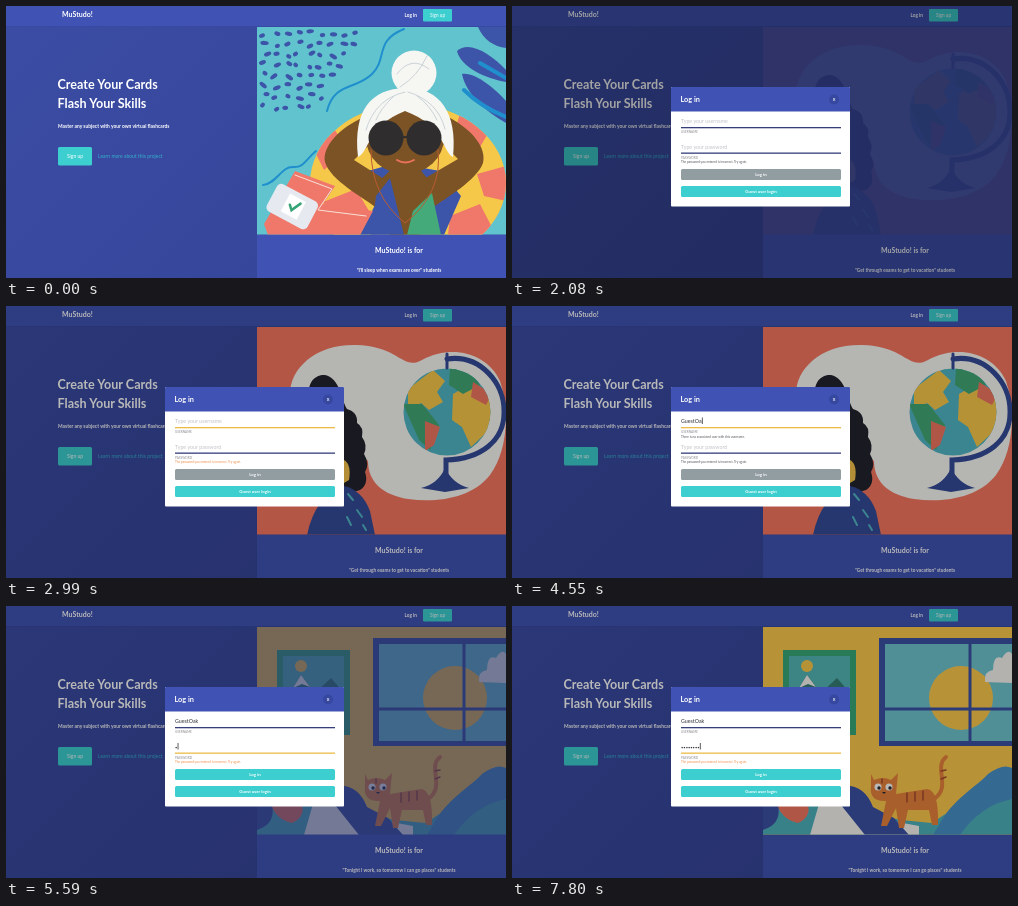
Write an HTML page that moves like this. It is 500x272 px and loops after 8000 ms.

```html
<!DOCTYPE html>
<html lang="en">
<head>
<meta charset="utf-8">
<title>Flashcards login</title>
<style>
  html, body { margin: 0; width: 100%; height: 100%; overflow: hidden; }
  svg { display: block; width: 100vw; height: 100vh; font-family: Lato, "Open Sans", sans-serif; }
  .page text { fill: #fff; font-size: 4.7px; }
  .bold { font-weight: 700; }
  .mid { text-anchor: middle; }
  .page .heading { font-size: 12.6px; }
  .page .brand { font-size: 7px; }
  .teal { fill: #3dcfd0; }
  .modal .input { font-size: 5.3px; }
  .modal .input.masked { font-size: 4px; }
  .modal .label { font-size: 3.1px; fill: #8c8c94; }
  .modal .error { font-size: 3.1px; }
  .modal .action { font-size: 4.4px; fill: #fff; }
  .line { fill: none; stroke-linecap: round; }
</style>
</head>
<body>
<svg viewBox="0 0 500 272" preserveAspectRatio="none">
  <defs>
    <linearGradient id="left" x2="1" y2="1">
      <stop stop-color="#3b4ca4"/><stop offset="1" stop-color="#36469a"/>
    </linearGradient>
    <clipPath id="art"><rect x="251" y="21" width="249" height="207.500"/></clipPath>
    <clipPath id="ring"><ellipse cx="402" cy="177" rx="98" ry="79"/></clipPath>
    <clipPath id="earth"><circle cx="441" cy="106" r="43.500"/></clipPath>
  </defs>

  <g class="page">
    <rect width="500" height="272" fill="#4053b4"/>
    <rect y="21" width="251" height="251" fill="url(#left)"/>
    <rect y="20" width="500" height="1" fill="#3849a2"/>
    <text class="brand bold" x="56" y="11">MuStudo!</text>
    <text class="bold" x="398.500" y="10.500">Log in</text>
    <rect class="teal" x="417" y="3" width="29" height="12.500" rx="1"/>
    <text class="mid" x="431.500" y="10.500">Sign up</text>
    <text class="heading bold" x="51.500" y="83">Create Your Cards</text>
    <text class="heading bold" x="51.500" y="101.500">Flash Your Skills</text>
    <text class="bold" x="52" y="122" style="font-size:4.9px">Master any subject with your own virtual flashcards</text>
    <rect class="teal" x="52" y="141" width="34" height="18.500" rx="1.500"/>
    <text class="mid" x="69" y="152" style="font-size:5px">Sign up</text>
    <text x="92" y="152" style="fill:#36b0cf;font-size:5px">Learn more about this project</text>
    <text class="brand bold mid" x="393" y="247">MuStudo! is for</text>
    <text class="bold mid" id="audience" x="393" y="266"></text>

    <rect x="251" y="21" width="249" height="207.500" fill="#3c4da6"/>
    <g clip-path="url(#art)">
      <g class="slide">
        <rect x="251" y="21" width="249" height="208" fill="#61c3cd"/>
        <g id="spots" fill="#3d55a9"></g>
        <g class="line" stroke="#208fcd" stroke-width="2">
          <path d="M257 179C270 178 276 160 287 161S300 153 310 145"/>
          <path d="M321 105C328 76 350 84 366 68S368 35 398 23"/>
        </g>
        <g fill="#3d55a9">
          <path d="M472 21H500V42C488 41 477 33 472 21Z"/>
          <path d="M451 45C463 34 485 48 500 64V76C478 72 455 61 451 45Z"/>
          <path d="M456 68C470 66 490 84 500 95V117C480 106 460 88 456 68Z"/>
        </g>
        <path class="line" stroke="#208fcd" stroke-width="4" d="M458 84Q475 101 500 111M474 57L500 72"/>
        <g clip-path="url(#ring)">
          <rect x="300" y="95" width="200" height="134" fill="#f6c84a"/>
          <path fill="#f0786b" d="M302 132L326 120 342 143 318 164ZM455 105L487 119 474 141 448 126ZM471 168L500 160V195L478 190ZM444 210L474 198 490 229H442ZM317 196L350 183 363 205 335 224Z"/>
        </g>
        <path fill="#3d55a9" d="M341 171L390 157 434 165 455 190 438 229H354L369 199Z"/>
        <g fill="#7b5324">
          <path d="M358 111C333 122 316 141 319 156C324 174 358 192 372 203L389 180 348 154 370 132Z"/>
          <path d="M442 111C466 123 481 142 477 157C471 174 440 192 426 202L409 178 452 153 431 132Z"/>
          <path d="M370 178L392 157H409L428 181 414 229H384Z"/>
          <ellipse cx="399" cy="132" rx="39" ry="36"/>
        </g>
        <path fill="#45aa79" d="M407 205L426 187 435 229H401Z"/>
        <path fill="#3d55a9" d="M370 190L384 172 398 229H365Z"/>
        <path fill="#f6f6f3" d="M352 151C347 104 365 83 399 82C433 81 452 106 447 151C436 145 439 120 399 105C361 120 364 145 352 151Z"/>
        <circle cx="408" cy="67" r="22.500" fill="#f6f6f3"/>
        <path class="line" stroke="#cbd3d8" d="M391 68Q405 49 423 63M394 81Q412 70 421 50M399 86Q369 93 360 124M402 86Q432 95 439 123M388 90Q374 103 370 114M411 90Q424 99 431 114"/>
        <g fill="#302d2e"><circle cx="380" cy="132" r="17.500"/><circle cx="418" cy="132" r="17.500"/></g>
        <path class="line" stroke="#302d2e" stroke-width="2" d="M393 133Q399 129 406 133M371 134Q380 140 388 134M410 134Q419 140 427 134"/>
        <path class="line" stroke="#e9715b" stroke-width="2" d="M391 154Q399 159 408 154"/>
        <path class="line" stroke="#b95c32" d="M365 144Q365 190 399 217Q437 187 432 144"/>
        <path fill="#f0786b" d="M258 218L289 165 329 180 317 198 367 205 354 229H262Z"/>
        <path class="line" stroke="#f7e2d6" d="M289 169L326 183 312 204L360 210"/>
        <g transform="rotate(28 286 201)">
          <rect x="263" y="185" width="46" height="31" rx="5" fill="#e6e9ef"/>
          <rect x="278" y="190" width="18" height="20" fill="#fff"/>
          <path class="line" stroke="#36a477" stroke-width="2.500" d="M283 200L287 204 292 194"/>
        </g>
      </g>

      <g class="slide">
        <rect x="251" y="21" width="249" height="208" fill="#f9775f"/>
        <path fill="#fbfaf7" d="M284 90C283 63 309 38 350 39C394 40 396 65 416 54C446 38 481 47 494 75C505 108 500 148 484 169C466 192 432 197 402 193C377 189 362 176 362 155L336 130Z"/>
        <path fill="#23242d" d="M306 100C297 78 309 68 319 69C334 72 335 93 341 103Q352 106 351 117Q358 121 356 131Q362 139 358 148Q364 158 359 166Q363 178 354 184L334 190Z"/>
        <path fill="#344b98" d="M301 229Q309 190 338 180Q356 184 364 205L369 229Z"/>
        <path fill="#f9c54c" d="M335 153Q346 155 343 174L333 180Z"/>
        <path class="line" stroke="#51b8c7" stroke-width="2" d="M342 188L347 194M351 204L356 211M341 211L345 219M357 219L360 224"/>
        <path class="line" stroke="#344b98" stroke-width="5" d="M441 53C474 48 499 77 498 107C498 134 476 153 440 154V168"/>
        <path fill="#344b98" d="M415 182Q432 178 439 162Q447 178 463 182L439 186Z"/>
        <g clip-path="url(#earth)">
          <rect x="396" y="61" width="91" height="91" fill="#51b8c7"/>
          <path fill="#fcca4c" d="M402 83L427 64 439 75 431 86 437 96 423 104 415 97 402 105ZM447 88L466 77 488 97 482 125 465 141 456 121 446 114Z"/>
          <path fill="#42aa77" d="M397 98L416 98 426 110 433 119 424 144 413 134ZM444 61L467 69 474 79 457 88 443 79Z"/>
          <path fill="#f47762" d="M419 115L434 121 428 139 419 145ZM467 76L486 88 480 99 465 91Z"/>
        </g>
        <path class="line" stroke="#344b98" stroke-width="3" d="M441 48V62"/>
      </g>

      <g class="slide">
        <rect x="251" y="21" width="249" height="208" fill="#ffca4c"/>
        <rect x="271" y="44" width="73" height="85" fill="#39aa78"/>
        <rect x="277" y="50" width="61" height="73" fill="#55b8b8"/>
        <path fill="#347e77" d="M277 98L295 69 309 87 325 72 338 87V123H277Z"/>
        <path fill="#f8f7f2" d="M287 82L295 69 304 81 296 78Z"/>
        <circle cx="295" cy="60" r="6" fill="#fcca4c"/>
        <rect x="367" y="32" width="140" height="108" fill="#3c52a5"/>
        <rect x="373" y="38" width="127" height="97" fill="#70c6d1"/>
        <circle cx="449" cy="92" r="32" fill="#ffca4c"/>
        <path fill="#f8f7f2" d="M473 76Q472 65 481 64Q481 48 490 52Q496 42 500 48V77Z"/>
        <path class="line" stroke="#3c52a5" stroke-width="3" d="M458 37V136M372 103H500"/>
        <path fill="#4fb3bd" d="M251 199H330Q366 213 420 217Q462 187 500 179V229H251Z"/>
        <path fill="#4892c8" d="M427 219C440 194 464 181 476 168Q491 157 500 162V193Q469 199 448 229H421Z"/>
        <path fill="#f8f7f2" d="M307 198H340L369 213 407 220V229H298Z"/>
        <path fill="#3c52a5" d="M329 180Q352 177 361 201L382 212 397 229H353L329 199Z"/>
        <path fill="#f47762" d="M265 199H296Q299 211 286 217Q271 214 265 199Z"/>
        <path fill="#3c52a5" d="M251 199H266Q270 218 251 224Z"/>
        <g fill="#ea843b">
          <path d="M359 168L362 174Q371 170 379 174L386 167 384 188 415 183Q427 184 426 219H420L417 204H396L392 222H387L384 202 375 220H369L374 195Q357 196 359 180Z"/>
          <path class="line" stroke="#ea843b" stroke-width="4" d="M422 193C440 181 421 161 434 151"/>
        </g>
        <path class="line" stroke="#a54b30" stroke-width="1.500" d="M395 187V196M403 186V195M411 185V194M370 173V177M429 173L434 171M429 165L434 164"/>
        <g fill="#fff"><circle cx="366" cy="181" r="3.500"/><circle cx="377" cy="181" r="3.500"/></g>
        <g fill="#27282f"><circle cx="367" cy="182" r="1.700"/><circle cx="378" cy="182" r="1.700"/><path d="M370 186H374L372 188Z"/></g>
      </g>
    </g>
  </g>

  <g class="modal" id="modal">
    <rect id="shade" width="500" height="272"/>
    <rect x="159" y="81" width="179" height="119.500" rx="1" fill="#fff"/>
    <path fill="#4053b4" d="M160 81H337Q338 81 338 82V105.500H159V82Q159 81 160 81Z"/>
    <text class="bold" x="168.500" y="96" font-size="7.300" fill="#fff">Log in</text>
    <circle cx="322" cy="93.500" r="5" fill="#35479f"/>
    <text class="mid bold" x="322" y="95" font-size="4" fill="#fff">X</text>

    <text class="input" id="username" x="169" y="117"></text>
    <rect id="userLine" x="169" y="121" width="160" height="1.300"/>
    <text class="label" x="169" y="127">USERNAME</text>
    <text class="error" id="userError" x="169" y="131.500" fill="#55555c">There is no associated user with this username.</text>

    <text class="input" id="password" x="169" y="142.500"></text>
    <rect id="passLine" x="169" y="146.500" width="160" height="1.300"/>
    <text class="label" x="169" y="152.500">PASSWORD</text>
    <text class="error" id="passError" x="169" y="157.300">The password you entered is incorrect. Try again.</text>
    <rect id="caret" width=".8" height="6.500" fill="#333"/>

    <rect id="submit" x="169" y="163" width="160" height="11" rx="1.500"/>
    <text class="action mid bold" x="249" y="170">Log in</text>
    <rect class="teal" x="169" y="180" width="160" height="11" rx="1.500"/>
    <text class="action mid bold" x="249" y="187">Guest user login</text>
  </g>
</svg>
<script>
  const LOOP = 8000, TICK = 130, FADE = 840;
  const USER = "GuestOak";
  const USER_KEYS = [3250, 3380, 3510, 3770, 4030, 4290, 4550, 4810];
  const PASS_KEYS = [5460, 5980, 6240, 6630, 6890, 7020, 7280, 7540];
  const MODAL_AT = 1170, USER_FOCUS = 2340, PASS_FOCUS = 4940;
  const SLIDES = [
    [-1100, "\"I'll sleep when exams are over\" students"],
    [2015, "\"Get through exams to get to vacation\" students"],
    [5135, "\"Tonight I work, so tomorrow I can go places\" students"]
  ];

  const el = id => document.getElementById(id);
  const fill = (id, color) => el(id).setAttribute("fill", color);
  const show = (id, visible) => { el(id).style.display = visible ? "" : "none"; };
  const typed = (keys, t) => keys.filter(k => t >= k).length;
  const slideEls = document.querySelectorAll(".slide");

  // Loose rows of slanted brush dots, thinning towards the lower right.
  function paintSpots() {
    let seed = 7, dots = "";
    const random = () => (seed = seed * 16807 % 2147483647) / 2147483647;
    for (let row = 0; row < 8; row++) {
      for (let col = 0; col < 9 - row * 0.6; col++) {
        const x = 256 + col * 11 + random() * 6, y = 25 + row * 10.5 + random() * 5;
        dots += `<ellipse cx="${x}" cy="${y}" rx="${2.5 + random() * 1.8}" ry="2.1" transform="rotate(${random() * 80 - 40} ${x} ${y})"/>`;
      }
    }
    el("spots").innerHTML = dots;
  }

  function setInput(id, value, placeholder) {
    el(id).textContent = value || placeholder;
    fill(id, value ? "#303038" : "#c3c3c8");
  }

  function placeCaret(id, value, y) {
    show("caret", value !== "");
    if (!value) return;
    el("caret").setAttribute("x", 169.3 + el(id).getComputedTextLength());
    el("caret").setAttribute("y", y);
  }

  function render(time) {
    const t = Math.floor(time / TICK) * TICK;

    const current = SLIDES.filter(([start]) => t >= start).length - 1;
    slideEls.forEach((slide, i) => {
      slide.style.opacity = i === current ? Math.min(1, (t - SLIDES[i][0]) / FADE) : 0;
    });
    el("audience").textContent = SLIDES[current][1];

    show("modal", t >= MODAL_AT);
    if (t < MODAL_AT) return;
    el("shade").setAttribute("opacity", t < 2990 ? 0.36 : 0.28);

    const user = USER.slice(0, typed(USER_KEYS, t));
    const pass = "•".repeat(typed(PASS_KEYS, t));
    const onPass = t >= PASS_FOCUS, onUser = t >= USER_FOCUS && !onPass;
    setInput("username", user, "Type your username");
    setInput("password", pass, "Type your password");
    el("password").classList.toggle("masked", pass !== "");
    fill("userLine", onUser ? "#edbb47" : "#343f7c");
    fill("passLine", onPass ? "#edbb47" : "#343f7c");
    show("userError", user && user !== USER);
    fill("passError", onPass || (onUser && !user) ? "#ef8d48" : "#55555c");
    fill("submit", pass ? "#3dcfd0" : "#929da2");
    if (onPass) placeCaret("password", pass, 137);
    else placeCaret("username", onUser ? user : "", 111.5);
  }

  function frame() {
    render(performance.now() % LOOP);
    requestAnimationFrame(frame);
  }

  paintSpots();
  frame();
</script>
</body>
</html>
```
